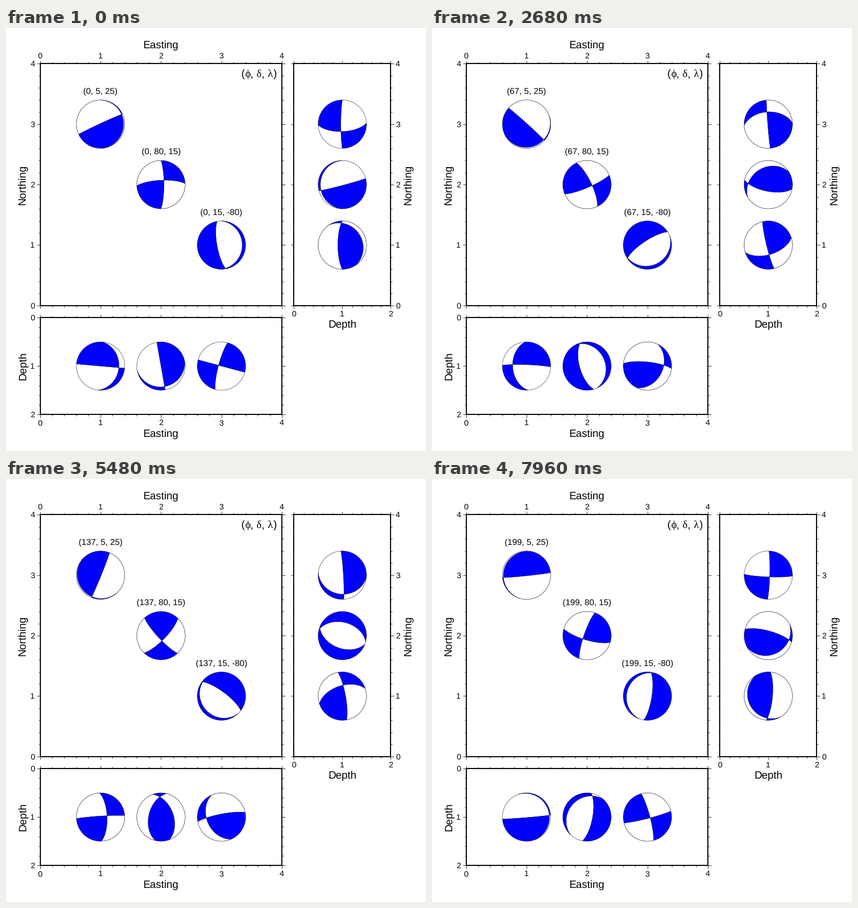
A matplotlib script for the animation above (8 s loop, 746x751 px).

```python
import numpy as np
import matplotlib.pyplot as plt
from matplotlib.animation import FuncAnimation
from matplotlib.patches import Circle, Polygon, Rectangle

W, H, DPI = 746, 751, 64
PT = 72 / DPI                      # points per pixel
UNIT, DEPTH_UNIT, RADIUS = 107.37, 85.9, 42.9
LEFT, TOP = 60.55, 63.35
RIGHT, BOTTOM = LEFT + 4 * UNIT, TOP + 4 * UNIT
SIDE = RIGHT + UNIT / 5 - 0.05     # left of side panel
LOW = BOTTOM + UNIT / 5            # top of lower panel
SIDE_END, LOW_END = SIDE + 2 * DEPTH_UNIT, LOW + 2 * DEPTH_UNIT
MAJOR, MINOR, GAP = 5.5, 2.9, 9.3
BLUE = "#0000ff"
SMALL, MEDIUM, LARGE = 14.2, 15.3, 18.9
PEN = 0.5 * PT

plt.rcParams["font.family"] = ["Liberation Sans", "DejaVu Sans"]
plt.rcParams["text.hinting"] = "none"

fig = plt.figure(figsize=(W / DPI, H / DPI), dpi=DPI, facecolor="white")
ax = fig.add_axes([0, 0, 1, 1])
ax.set(xlim=(0, W), ylim=(H, 0))
ax.axis("off")


def text(x, y, s, size, ha="center", va="baseline", **kw):
    return ax.text(x, y, s, fontsize=size * PT, ha=ha, va=va, **kw)


def line(xs, ys):
    ax.plot(xs, ys, color="black", lw=0.75 * PT, solid_capstyle="butt")


def x_ticks(x0, unit, count, y, out):
    for k in range(5 * count + 1):
        x = x0 + k * unit / 5
        line([x, x], [y, y + out * (MINOR if k % 5 else MAJOR)])


def y_ticks(y0, unit, count, x, out):
    for k in range(5 * count + 1):
        y = y0 + k * unit / 5
        line([x, x + out * (MINOR if k % 5 else MAJOR)], [y, y])


def panel(x0, y0, x1, y1, nx, ny):
    ux, uy = (x1 - x0) / nx, (y1 - y0) / ny
    for y, out in ((y0, -1), (y1, 1)):
        x_ticks(x0, ux, nx, y, out)
    for x, out in ((x0, -1), (x1, 1)):
        y_ticks(y0, uy, ny, x, out)
    ax.add_patch(Rectangle((x0, y0), x1 - x0, y1 - y0, fill=False,
                           ec="black", lw=1.9 * PT, zorder=3))


def x_numbers(x0, unit, count, baseline):
    for k in range(count + 1):
        text(x0 + k * unit, baseline, str(k), SMALL)


def y_numbers(y0, unit, count, x, ha):
    for k in range(count + 1):
        text(x, y0 + k * unit + 0.35 * SMALL, str(k), SMALL, ha)


def upright(baseline, y, s):
    text(baseline, y, s, LARGE, rotation=90, rotation_mode="anchor")


panel(LEFT, TOP, RIGHT, BOTTOM, 4, 4)
panel(SIDE, TOP, SIDE_END, BOTTOM, 2, 4)
panel(LEFT, LOW, RIGHT, LOW_END, 4, 2)

x_numbers(LEFT, UNIT, 4, TOP - GAP)
x_numbers(LEFT, UNIT, 4, LOW_END + GAP + 10)
x_numbers(SIDE, DEPTH_UNIT, 2, BOTTOM + GAP + 10)
y_numbers(BOTTOM, -UNIT, 4, LEFT - GAP, "right")
y_numbers(BOTTOM, -UNIT, 4, SIDE_END + GAP - 0.6, "left")
y_numbers(LOW, DEPTH_UNIT, 2, LEFT - GAP, "right")

MID_X, MID_Y = LEFT + 2 * UNIT, TOP + 2 * UNIT
text(MID_X, 35.7, "Easting", LARGE)
text(MID_X, 725.7, "Easting", LARGE)
text(SIDE + DEPTH_UNIT, 532.2, "Depth", LARGE)
upright(35, MID_Y, "Northing")
upright(719.3, MID_Y, "Northing")
upright(35.5, LOW + DEPTH_UNIT, "Depth")

# Key with Greek symbols in a serif face
SERIF = ["Liberation Serif", "DejaVu Serif"]
key_x = 417.8
for s, step, greek in (("(", .333, False), ("\u03d5", .521, True),
                       (", ", .556, False), ("\u03b4", .494, True),
                       (", ", .556, False), ("\u03bb", .549, True),
                       (")", .333, False)):
    kw = {"family": SERIF} if greek else {}
    text(key_x, 87.2, s, LARGE, ha="left", **kw)
    key_x += step * LARGE

# Viewing frames: screen right, screen up, into the screen (north, east, down)
NORTH, EAST, DOWN = np.eye(3)
PLAN = np.array([EAST, NORTH, DOWN])
FROM_EAST = np.array([DOWN, NORTH, -EAST])
FROM_SOUTH = np.array([EAST, -DOWN, NORTH])

ARC = np.linspace(0, np.pi, 181)[:, None]


def fault_vectors(strike, dip, rake):
    """Fault normal and slip direction in north, east, down."""
    f, d, r = np.radians([strike, dip, rake])
    normal = np.array([-np.sin(d) * np.sin(f), np.sin(d) * np.cos(f),
                       -np.cos(d)])
    slip = np.array([
        np.cos(r) * np.cos(f) + np.cos(d) * np.sin(r) * np.sin(f),
        np.cos(r) * np.sin(f) - np.cos(d) * np.sin(r) * np.cos(f),
        -np.sin(r) * np.sin(d)])
    return normal, slip


def lune(a, b):
    """Equal-area outline of the quadrant a > 0, b > 0, cut to the disc."""
    axis = np.cross(a, b)
    p = np.vstack([axis * np.cos(ARC) + b * np.sin(ARC),
                   -axis * np.cos(ARC) + a * np.sin(ARC)])
    ang = np.unwrap(np.arctan2(p[:, 1], p[:, 0]))
    rad = np.sqrt(np.clip(1 - p[:, 2], 0, 1))
    # Subdivide wide turns so that they follow the rim
    steps = np.maximum(1, np.ceil(np.abs(np.diff(ang)) / 0.05))
    at = np.concatenate([[0], np.cumsum(steps)])
    q = np.arange(at[-1] + 1)
    ang, rad = np.interp(q, at, ang), np.interp(q, at, rad)
    return np.column_stack([rad * np.cos(ang), -rad * np.sin(ang)]), rad


class Ball:
    def __init__(self, x, y, view):
        self.center, self.view = np.array([x, y]), view
        self.disc = ax.add_patch(Circle((x, y), RADIUS, lw=0))
        self.lunes = [ax.add_patch(Polygon([(x, y)] * 3, lw=0))
                      for _ in range(2)]
        self.planes = [ax.plot([], [], color="black", lw=PEN)[0]
                       for _ in range(2)]
        ax.add_patch(Circle((x, y), RADIUS, fill=False, ec="black",
                            lw=PEN, zorder=3))

    def update(self, normal, slip):
        n, d = self.view @ normal, self.view @ slip
        inside = n[2] * d[2] > 0
        self.disc.set_facecolor(BLUE if inside else "white")
        if inside:
            d = -d
        for patch, plane, sign in zip(self.lunes, self.planes, (1, -1)):
            xy, rad = lune(sign * n, sign * d)
            xy = self.center + RADIUS * xy
            patch.set_xy(xy)
            patch.set_facecolor("white" if inside else BLUE)
            plane.set_data(np.where(rad < 1, xy.T, np.nan))


faults = []
for k, (dip, rake) in enumerate([(5, 25), (80, 15), (15, -80)], 1):
    x, y = LEFT + k * UNIT, TOP + k * UNIT
    balls = [Ball(x, y, PLAN),
             Ball(SIDE + DEPTH_UNIT, y, FROM_EAST),
             Ball(x, LOW + DEPTH_UNIT, FROM_SOUTH)]
    faults.append((dip, rake, balls, text(x, y - 53.7, "", MEDIUM)))


def update(strike):
    for dip, rake, balls, label in faults:
        label.set_text(f"({strike}, {dip}, {rake})")
        # A tiny offset keeps the planes off the exact view axes
        vectors = fault_vectors(strike + 0.01, dip, rake)
        for ball in balls:
            ball.update(*vectors)
    return []


anim = FuncAnimation(fig, update, frames=200, interval=40,
                     init_func=lambda: update(0), repeat=True,
                     repeat_delay=0, blit=False)
plt.show()
```
